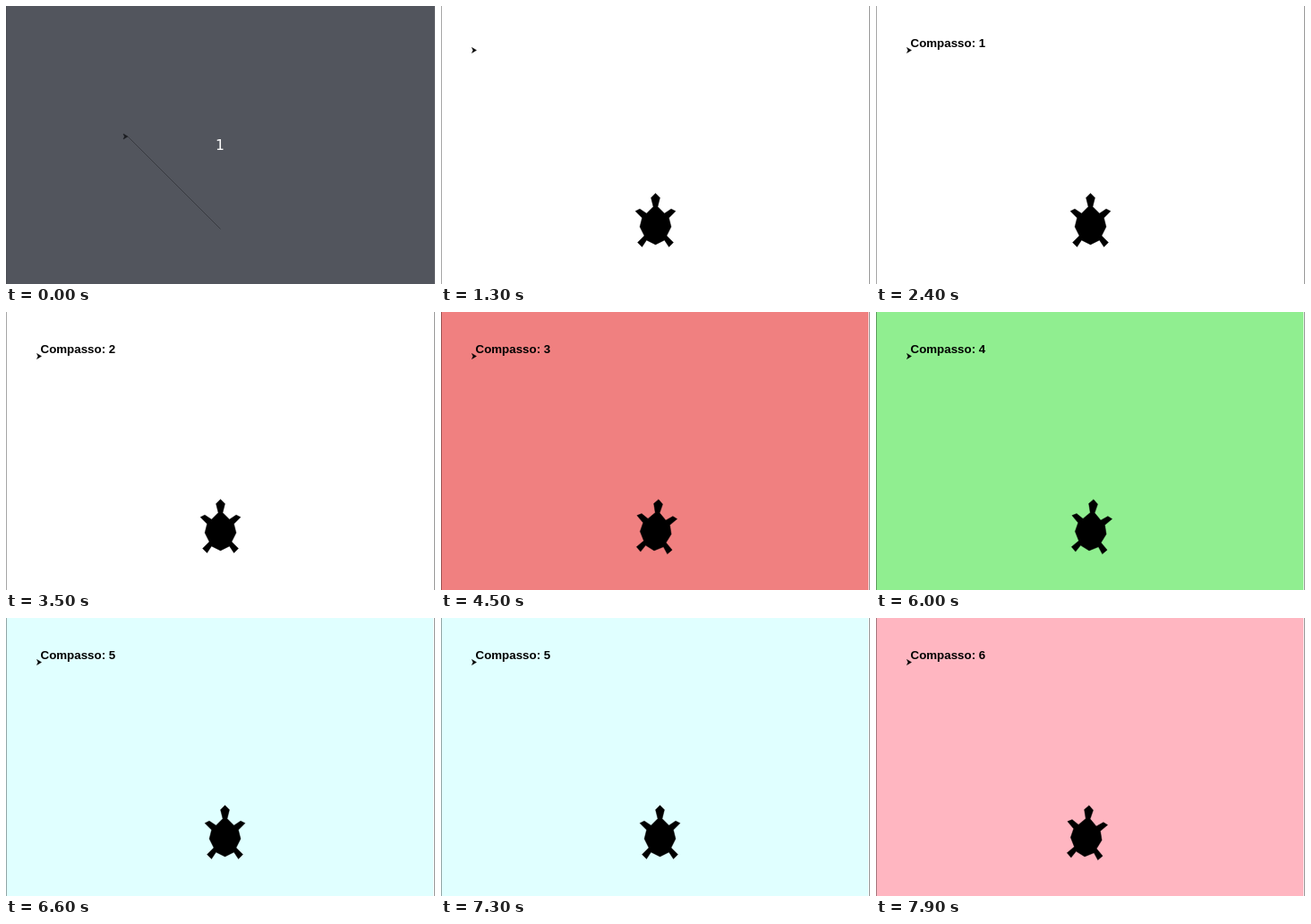
Write an HTML page that moves like this. It is 479 by 311 pixels and loops after 8000 ms.

```html
<!DOCTYPE html>
<html lang="pt">
<head>
<meta charset="utf-8">
<title>Compasso</title>
<style>
  html, body { margin: 0; width: 100%; height: 100%; overflow: hidden; }
  svg { display: block; width: 479px; height: 311px; }
  #label { font: bold 13.33px "Liberation Sans", Arial, sans-serif; }
  #count { font: 15.5px "DejaVu Sans", sans-serif; fill: #fff; text-anchor: middle; }
</style>
</head>
<body>
<svg viewBox="0 0 479 311">
  <rect id="bg" width="479" height="311"/>
  <rect id="gap" x="477" width="1" height="311" fill="#fff" opacity=".7"/>
  <g id="edges">
    <rect width="1" height="311" opacity=".35"/>
    <rect x="478" width="1" height="311" fill="#999"/>
  </g>
  <line id="trail" x1="239.5" y1="249.5"/>
  <polygon id="turtle" stroke="#000" stroke-width=".4"/>
  <polygon id="arrow" points="0,0 -5,-3 -3.6,0 -5,3" stroke-width=".5"/>
  <text id="label" x="38.5" y="46"></text>
  <text id="count" x="239" y="160.5">1</text>
</svg>
<script>
const LOOP = 8000, TICK = 100, BEAT = 250;
const $ = id => document.getElementById(id);
const set = (id, attrs) => {
  for (const k in attrs) $(id).setAttribute(k, attrs[k]);
};
const show = (id, on) => set(id, { visibility: on ? 'visible' : 'hidden' });

// Right half of the turtle, nose to tail; the left half is its mirror.
const half = [[0, 16], [2, 14], [1, 10], [4, 7], [7, 9], [9, 8], [6, 5],
  [7, 1], [5, -3], [8, -6], [6, -8], [4, -5], [0, -7]];
const mirror = half.slice(1, -1).reverse().map(([x, y]) => [-x, y]);
set('turtle', {
  points: half.concat(mirror).map(([x, y]) => [x * 2.5, -y * 2.5]).join(' ')
});

// Bars: start time, background
const bars = [[1400, '#fff'], [2400, '#fff'], [3500, '#fff'], [4500, '#f08080'],
  [5500, '#90ee90'], [6600, '#e0ffff'], [7600, '#ffb6c1']];

// Swings between 1 and -1, starting at 1 when t equals from.
const swing = (t, from) =>
  ((t - from) % BEAT + BEAT) % BEAT < BEAT / 2 ? 1 : -1;

function slowTilt(t) {
  const p = (t - 4500) % 500;
  return p < 200 ? 5 : p < 300 ? 0 : -5;
}

function fastTilt(t) {
  return 5 * Math.cos(2 * Math.PI * (t - 6000) / BEAT);
}

function pose(bar, t) {
  if (bar === 3) return [0, slowTilt(t)];
  if (bar === 4) return [0, fastTilt(t)];
  if (bar === 5) return [5 * swing(t, 7300), 0];
  if (bar === 6) return [-5 * swing(t, 7900), 5 * swing(t, 7900)];
  return [0, 0];
}

function draw(now) {
  const t = Math.floor(now % LOOP / TICK) * TICK;
  const dim = t < 100;
  const bar = bars.filter(b => t >= b[0]).length - 1;
  const [dx, tilt] = pose(bar, t);

  set('bg', { fill: dim ? '#52555d' : bar < 0 ? '#fff' : bars[bar][1] });
  set('edges', { opacity: dim ? 0.3 : 1 });
  show('gap', !dim);
  show('count', dim);

  const way = 103.5 + 96.5 * Math.min(1, t / 300);
  const x = 239.5 - way, y = 249.5 - way;
  const ink = dim ? '#1b1c20' : '#000';
  set('arrow', { transform: `translate(${x} ${y})`, fill: ink, stroke: ink });
  set('trail', { x2: x, y2: y, stroke: dim ? '#383a40' : '#000' });
  show('trail', t < 1300);

  set('turtle', { transform: `translate(${239.5 + dx} 249.5) rotate(${tilt})` });
  show('turtle', t >= 400);

  const cleared = t === 2300 || t === 3400;
  $('label').textContent = bar < 0 || cleared ? '' : 'Compasso: ' + bar;
}

const start = performance.now();
function loop() {
  draw(performance.now() - start);
  requestAnimationFrame(loop);
}
loop();
</script>
</body>
</html>
```
